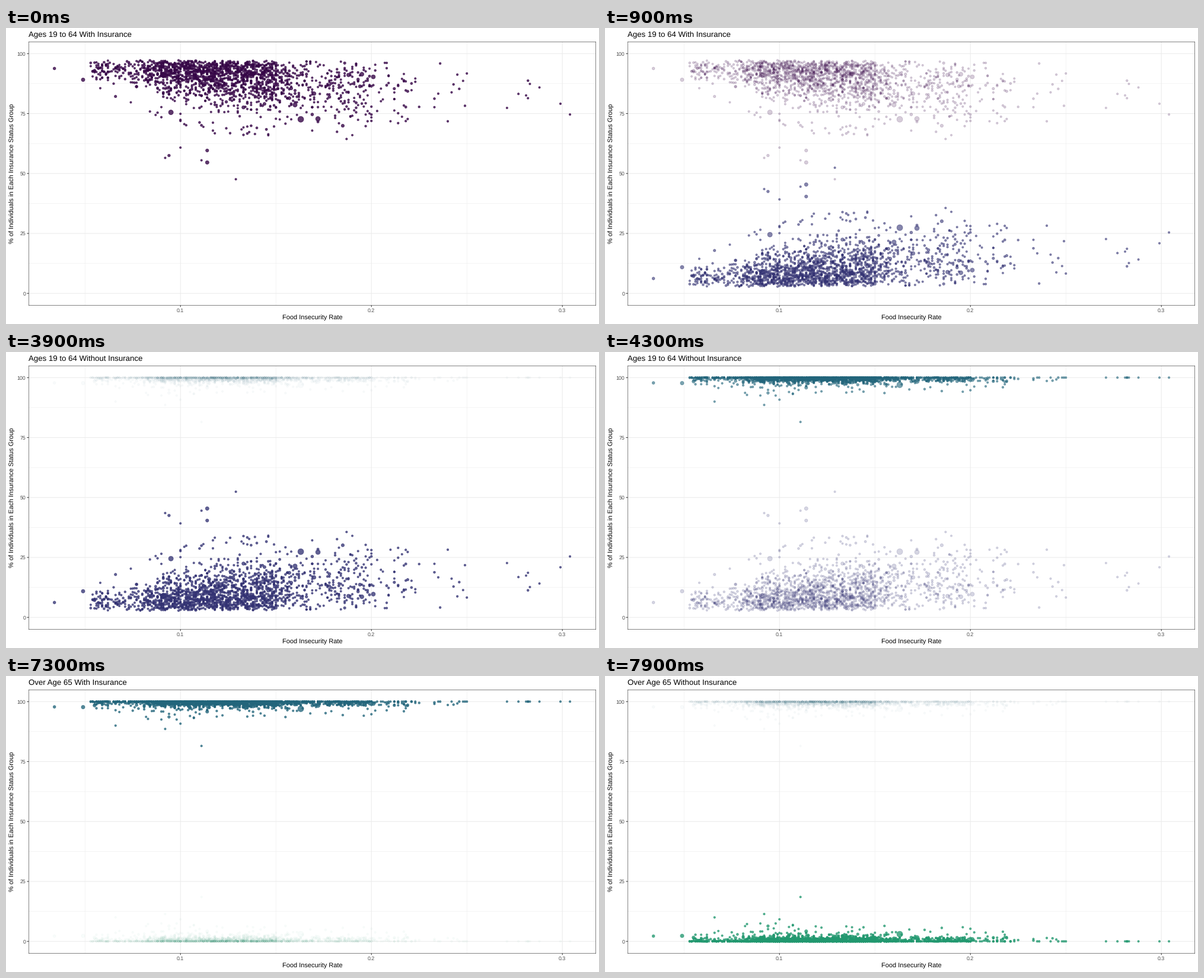
Write a matplotlib script that moves like this. It is 1000 px wide and 500 px high and loops after 8 s.

```python
import numpy as np
import matplotlib.pyplot as plt
from matplotlib.animation import FuncAnimation

DPI = 100
PT = 72 / DPI                     # one pixel in points
STEP = 100                        # ms per frame
FRAMES = 80
FADES = (500, 3900, 7300)         # start of each cross-fade
FADE_STEP, FADE_COUNT = 200, 5
ALPHA = 0.8
LEFT, RIGHT, TOP, BOTTOM = 38.2, 994.5, 23.0, 468.5
GRID, DARK, GREY = "#ebebeb", "#333333", "#4d4d4d"

GROUPS = [
    ("Ages 19 to 64 With Insurance", "#360647"),
    ("Ages 19 to 64 Without Insurance", "#333273"),
    ("Over Age 65 With Insurance", "#22657b"),
    ("Over Age 65 Without Insurance", "#21986f"),
]

# Landmarks: rate, % insured under 65, % insured over 65, dot diameter
LANDMARKS = [
    (0.034, 93.8, 97.8, 5.4), (0.049, 89.1, 97.7, 6.8), (0.066, 94.0, 90.0, 4.0),
    (0.092, 56.5, 88.6, 4.0), (0.094, 57.5, 93.6, 5.2), (0.095, 75.5, 99.0, 8.8),
    (0.100, 60.8, 90.8, 4.0), (0.111, 55.5, 81.5, 4.0), (0.114, 59.6, 95.8, 6.0),
    (0.114, 54.6, 99.0, 6.8), (0.129, 47.6, 99.5, 4.0), (0.160, 78.6, 99.0, 8.0),
    (0.163, 72.6, 97.0, 10.6), (0.172, 72.8, 98.5, 8.6), (0.195, 91.4, 99.0, 7.6),
    (0.201, 90.3, 99.2, 7.6), (0.299, 79.1, 100, 4.0), (0.304, 74.6, 100, 4.0),
]

plt.rcParams["font.family"] = "Liberation Sans"
plt.rcParams["text.hinting"] = "none"


def px(rate):
    return 294.2 + (np.asarray(rate) - 0.1) * 3220


def py(percent):
    return 448.25 - np.asarray(percent) * 4.05


def make_data(n=1870):
    rng = np.random.default_rng(19)
    # Rates follow a few quantiles and are rounded to three places
    rate = np.interp(rng.random(n),
                     [0, 0.07, 0.13, 0.23, 0.68, 0.79, 0.845, 0.962, 0.986, 1],
                     [0.053, 0.08, 0.09, 0.1, 0.14, 0.15, 0.16, 0.2, 0.222, 0.3]).round(3)

    # Skewed share without insurance, wider at higher rates, with a few stragglers
    cap = np.interp(rate, [0.055, 0.08, 0.11, 0.2], [11, 19, 28, 32])
    skew = np.interp(rate, [0.055, 0.09, 0.12, 0.16, 0.2, 0.3], [2, 4, 3.7, 2.3, 1.9, 1.2])
    young = 2.8 + (cap - 2.8) * rng.beta(1.5, skew)
    young = np.where(rng.random(n) < 0.015, cap + rng.uniform(0, 5, n), young)

    size = 3.9 + rng.exponential(0.2, n)
    size += (rng.random(n) < 0.1) * rng.exponential(0.9, n)
    size = np.minimum(size, 7)

    # Over 65: many small places have nobody without insurance
    old = rng.exponential(0.85, n) * (rng.random(n) > 0.42)
    old = np.where(size > 4.7, rng.gamma(3, 0.33, n), old)
    old = np.where(rng.random(n) < 0.015, rng.uniform(3, 7.5, n), old)
    old[rate > 0.245] = 0

    cloud = np.column_stack([rate, 100 - young, 100 - old, size])
    rate, young, old, size = np.vstack([LANDMARKS, cloud]).T
    return rate, size, [young, 100 - young, old, 100 - old]


fig = plt.figure(figsize=(10, 5), dpi=DPI, facecolor="white")
ax = fig.add_axes([0, 0, 1, 1])
ax.set(xlim=(0, 1000), ylim=(500, 0))
ax.axis("off")


def line(xs, ys, color, width, z):
    ax.plot(xs, ys, color=color, lw=width * PT, zorder=z, snap=False,
            solid_capstyle="butt")


def label(x, y, text, size, color="black", **kw):
    return ax.text(x, y, text, fontsize=size * PT, color=color,
                   va="baseline", rotation_mode="anchor", **kw)


def draw_chart():
    for r in (0.05, 0.15, 0.25):
        line([px(r)] * 2, [TOP, BOTTOM], GRID, 0.53, 0)
    for p in (12.5, 37.5, 62.5, 87.5):
        line([LEFT, RIGHT], [py(p)] * 2, GRID, 0.53, 0)
    for r in (0.1, 0.2, 0.3):
        line([px(r)] * 2, [TOP, BOTTOM], GRID, 1.07, 1)
        line([px(r)] * 2, [BOTTOM, BOTTOM + 2.75], DARK, 1.07, 8)
        label(px(r), 479.9, f"{r:.1f}", 8.8, GREY, ha="center")
    for p in (0, 25, 50, 75, 100):
        line([LEFT, RIGHT], [py(p)] * 2, GRID, 1.07, 1)
        line([LEFT - 2.75, LEFT], [py(p)] * 2, DARK, 1.07, 8)
        label(33.2, py(p) + 3.2, str(p), 8.8, GREY, ha="right")
    # Thin border on whole pixels
    for y in (23.5, 468.5):
        line([38, 995], [y, y], DARK, 0.6, 7)
    for x in (38.5, 994.5):
        line([x, x], [23, 469], DARK, 0.6, 7)
    label((LEFT + RIGHT) / 2, 493.2, "Food Insecurity Rate", 11, ha="center")
    label(13.3, (TOP + BOTTOM) / 2, "% of Individuals in Each Insurance Status Group",
          11, ha="center", rotation=90)


draw_chart()
title = label(LEFT, 15, "", 13.2, ha="left")

rates, sizes, columns = make_data()
layers = [
    ax.scatter(px(rates), py(col), s=((sizes - 0.7) * PT) ** 2, c=color,
               edgecolors=color, linewidths=0.7 * PT, zorder=3 + j * 0.1)
    for j, (col, (_, color)) in enumerate(zip(columns, GROUPS))
]


def ease(p):
    return 4 * p ** 3 if p < 0.5 else 1 - 4 * (1 - p) ** 3


def update(i):
    t = i * STEP
    steps = [min(max((t - s) // FADE_STEP + 1, 0), FADE_COUNT) for s in FADES]
    fade = [1] + [ease(k / FADE_COUNT) for k in steps] + [0]
    for j, layer in enumerate(layers):
        alpha = ALPHA * fade[j] * (1 - fade[j + 1])
        layer.set_alpha(alpha)
        layer.set_visible(alpha > 0)
    # The heading switches one step before a fade ends
    title.set_text(GROUPS[sum(k >= FADE_COUNT - 1 for k in steps)][0])
    return [*layers, title]


anim = FuncAnimation(fig, update, frames=FRAMES, interval=STEP,
                     repeat=True, repeat_delay=0, blit=False)
plt.show()
```
